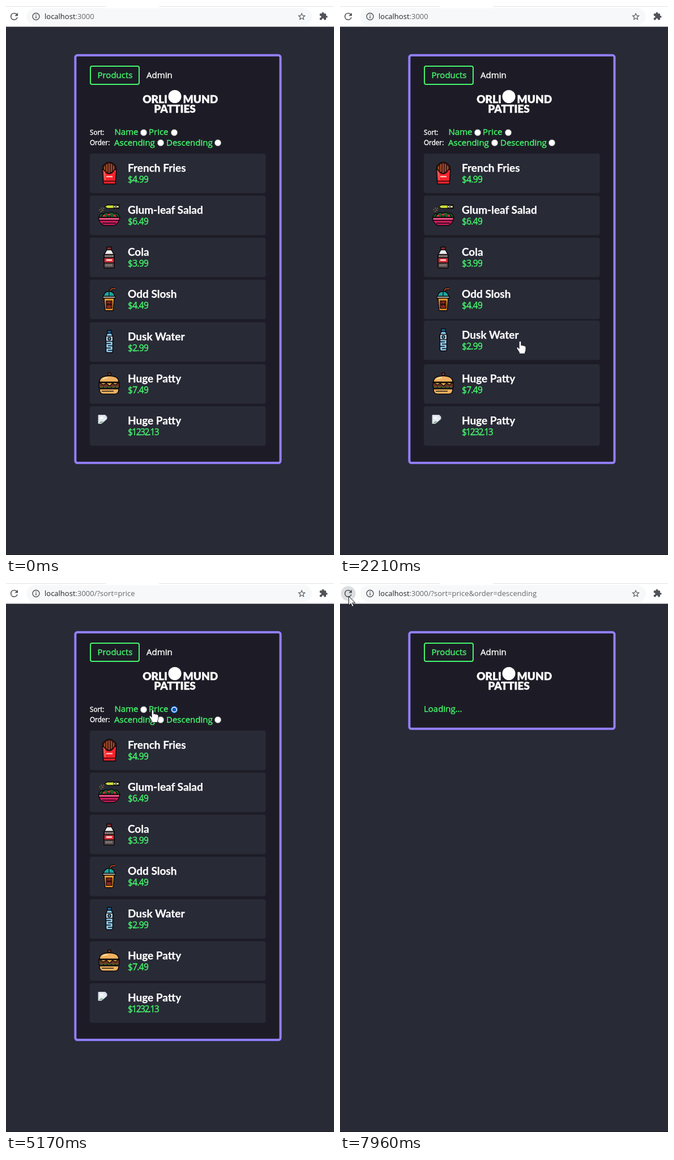
An HTML page that plays this animation: 579 by 967 pixels, repeating every 8000 ms.

```html
<!DOCTYPE html>
<html lang="en">
<head>
<meta charset="utf-8">
<title>Menu</title>
<style>
  html, body { margin: 0; width: 100%; height: 100%; overflow: hidden; background: #282a36; }
  svg { display: block; width: 579px; height: 967px; }
  text { font: 15px "Open Sans", sans-serif; fill: #fff; stroke: #fff; stroke-width: .4; white-space: pre; }
  .green { fill: #45f56d; stroke: #45f56d; }
  .url { font-size: 13px; fill: #63676c; stroke: none; }
  .host { fill: #202327; }
  .small { font-size: 11.7px; }
  .title { font: 700 19px Lato, sans-serif; stroke-width: .25; }
  .price { font-size: 15.5px; letter-spacing: -.7px; }
  .long { letter-spacing: -1.5px; }
  .brand { font: 900 19px Lato, sans-serif; }
  .ink { stroke: #08080b; stroke-width: 1.4; stroke-linejoin: round; }
  .line { fill: none; stroke: #08080b; stroke-width: 1.3; }
</style>
</head>
<body>
<svg viewBox="0 0 579 967">
  <defs>
    <g id="fries">
      <path class="ink" fill="#4a1a14" d="M-11 2V-13L-6-17L-2-19H4L8-16L12-12V2Z"/>
      <path d="M-8-12V-5M-4-16V-3M0-17V-1M4-16V-3M8-13V-5" stroke="#b9602f" stroke-width="1.6"/>
      <path class="ink" fill="#f5232b" d="M-12-7L-9-6Q-6 1 0 1T9-6L13-7L11 19H-10Z"/>
      <path class="line" d="M-10 14H11"/>
      <path d="M-5 6H6" stroke="#ffd9d0" stroke-width="2"/>
      <path d="M-8-3L-7 12" stroke="#ff7a70" stroke-width="1.5"/>
    </g>
    <g id="salad">
      <path class="ink" fill="#cfe03a" d="M-8-15L-3-18H18V-12H-3Z"/>
      <path d="M8-17H11V-13H8ZM13-17H17V-13H13Z" fill="#f5f5d8" stroke="#111"/>
      <path d="M-9-13L-13-9M-13-13L-18-8M-10-9L-16-5" stroke="#8c8130" stroke-width="1.5" stroke-dasharray="2 2"/>
      <path class="ink" fill="#1f5f2b" d="M-18 4Q-16-5-10-2Q-6-7-1-3Q4-8 9-3Q16-6 19 4Z"/>
      <path class="line" d="M-14 3L-11-1L-8 3M-3 3L0-2L3 3M8 3L12-1L15 3"/>
      <path d="M-11 1h4M-2-1h4M8 1h4" stroke="#e2283c" stroke-width="3"/>
      <path class="ink" fill="#cf1c5e" d="M-19 4H19Q18 14 9 18H-9Q-18 14-19 4Z"/>
      <path d="M-17 6.5H17" stroke="#ff80a5" stroke-width="1.3"/>
      <path class="line" d="M-17 9H17M-12 14H12"/>
    </g>
    <g id="cola">
      <path class="ink" fill="#8e2d2b" d="M-4-18H4V-13H-4Z"/>
      <path class="ink" fill="#f0efec" d="M-4-13H4L9-4H-9Z"/>
      <path class="ink" fill="#5d5050" d="M-9-5H9V17Q9 19 7 19H-7Q-9 19-9 17Z"/>
      <path class="ink" fill="#d9323a" d="M-9 1H9V10H-9Z"/>
      <path d="M-5 5H5" stroke="#ffe9e3" stroke-width="2.4"/>
      <path d="M-7-2H7M-6 14H6" stroke="#a39494" stroke-width="2" stroke-dasharray="2 1"/>
    </g>
    <g id="cup">
      <path d="M1-13L4-18L11-19" fill="none" stroke="#08080b" stroke-width="4"/>
      <path d="M1-13L4-18L11-19" fill="none" stroke="#c9572b" stroke-width="1.4"/>
      <path class="ink" fill="#1fa59f" d="M-10-5Q-8-14 0-14T10-5Z"/>
      <path class="ink" fill="#f79a2c" d="M-9-2H9L7 20H-7Z"/>
      <path class="ink" fill="#e8e2d4" d="M-11-5H11V-2H-11Z"/>
      <path class="ink" fill="#a92d22" d="M-5 3H5V16H-5Z"/>
      <path class="line" d="M0-14V-5M-2 5V13M2 5V13M-4 9H4"/>
    </g>
    <g id="water">
      <path class="ink" fill="#1c6da4" d="M-3-20H4V-15H-3Z"/>
      <path class="ink" fill="#8fcdf2" d="M-3-15H4L6.5-10V17L5 19H-4L-5.5 17V-10Z"/>
      <path class="ink" fill="#d9eefa" d="M-5.5-10H6.5V-1H-5.5Z"/>
      <circle cx=".5" cy="-5.5" r="2.6" fill="#2b91c9" stroke="#08080b" stroke-width="1.4"/>
      <path class="line" stroke-width="2" d="M-5.5 3H3M-2 7H6.5M-5.5 11H3M-2 15H6.5"/>
    </g>
    <g id="burger">
      <path class="ink" fill="#a33a2b" d="M-2-19H3V-15H-2Z"/>
      <path class="ink" fill="#efb160" d="M-17-3Q-17-14 0-14T17-3Z"/>
      <path d="M-11-8Q-8-11-2-11" stroke="#ffe0a2" stroke-width="2" fill="none"/>
      <path class="ink" fill="#6b3425" d="M-18-3H18V7H-18Z"/>
      <path class="ink" d="M-17-2H17L11 2L6-1L1 4L-5-1L-10 2Z" fill="#e0a53f"/>
      <path d="M-16 6H16" stroke="#4d7d35" stroke-width="1.6" stroke-dasharray="5 2"/>
      <path class="ink" fill="#efb160" d="M-17 9H17Q17 18 10 18H-10Q-17 18-17 9Z"/>
      <path class="line" d="M-13 13H8"/>
    </g>
    <g id="broken">
      <path d="M-19-19H-7L-4-16V-12L-11-6L-14-4H-19Z" fill="#e4ebf3" stroke="#c3c8cf"/>
      <path d="M-18-5Q-14-10-10-7L-14-5Z" fill="#7fae86"/>
      <path d="M-16-14h5" stroke="#fff" stroke-width="3"/>
      <path d="M-7-19V-16H-4" fill="#fff" stroke="#c3c8cf"/>
    </g>
  </defs>

  <rect width="579" height="967" fill="#282a36"/>
  <rect y="966" width="579" height="1" fill="#1c1d26"/>
  <rect width="579" height="36.5" fill="#fff"/>
  <path d="M0 .5H176M270 .5H579" stroke="#dfe2e6"/>
  <rect x="36" y="4" width="504" height="29" rx="14.5" fill="#f7f8f9"/>
  <circle id="halo" cx="14.5" cy="18.5" r="13" fill="#dcdee1"/>
  <g fill="#505357">
    <path transform="translate(4.6 8.6) scale(.82)" d="M17.65 6.35A7.96 7.96 0 0 0 12 4a8 8 0 1 0 7.73 10h-2.08A6 6 0 1 1 12 6c1.66 0 3.14.69 4.22 1.78L13 11h7V4z"/>
    <path transform="translate(513.8 10.3) scale(.69)" d="M22 9.24l-7.19-.62L12 2 9.19 8.63 2 9.24l5.46 4.73L5.82 21 12 17.27 18.18 21l-1.63-7.03zM12 15.4l-3.76 2.27 1-4.28-3.32-2.88 4.38-.38L12 6.1l1.71 4.04 4.38.38-3.32 2.88 1 4.28z"/>
    <path transform="translate(552.5 10) scale(.66)" d="M20.5 11H19V7c0-1.1-.9-2-2-2h-4V3.5a2.5 2.5 0 0 0-5 0V5H4c-1.1 0-2 .9-2 2v3.8h1.5a2.7 2.7 0 0 1 0 5.4H2V20c0 1.1.9 2 2 2h3.8v-1.5a2.7 2.7 0 0 1 5.4 0V22H17c1.1 0 2-.9 2-2v-4h1.5a2.5 2.5 0 0 0 0-5z"/>
    <circle cx="53" cy="18.5" r="6" fill="none" stroke="#505357" stroke-width="1.4"/>
    <path d="M52.3 17.8h1.5v4h-1.5zM52.3 15h1.5v1.5h-1.5z"/>
  </g>
  <text class="url" x="68" y="23"><tspan class="host">localhost</tspan>:3000<tspan id="query"></tspan></text>

  <rect id="panel" x="122.4" y="86.8" width="362.1" fill="#1d1c26" stroke="#9580ff" stroke-width="4" rx="3.5"/>
  <rect x="149" y="106" width="86" height="32" rx="3" fill="none" stroke="#45f56d" stroke-width="2"/>
  <text class="green" x="161.5" y="127">Products</text>
  <text x="248" y="127">Admin</text>
  <text class="brand" x="285" y="171" text-anchor="end">ORLI</text>
  <circle cx="298" cy="159.5" r="11.5" fill="#fff"/>
  <text class="brand" x="312.5" y="171">MUND</text>
  <text class="brand" x="298" y="188" text-anchor="middle">PATTIES</text>
  <text id="loading" class="green" x="148" y="227">Loading...</text>

  <g id="list">
    <text class="small" x="148" y="227">Sort:</text>
    <text class="green" x="191.5" y="227">Name</text>
    <text class="green" x="252" y="227">Price</text>
    <text class="small" x="148" y="245">Order:</text>
    <text class="green" x="191" y="246">Ascending</text>
    <text class="green" x="283" y="246">Descending</text>
  </g>

  <path id="hand" fill="#fff" stroke="#15151b" stroke-width=".8" d="M-1.8 1.5Q0-1 1.8 1.5V8Q4 6.5 5 8.5Q7 7 8 9.3Q10 8.5 10 11V15Q10 18 8.5 20V22.5H-1.5V20L-6 13Q-6.5 10.5-4 11L-1.8 13.5Z"/>
  <path id="arrow" fill="#fff" stroke="#15151b" d="M.5.5V16.5L4.2 13L6.7 18.7L9.2 17.6L6.7 12H11.8Z"/>
</svg>
<script>
const NS = 'http://www.w3.org/2000/svg';
const LOOP = 8000, TOP = 259.7, PITCH = 74.2;
const $ = id => document.getElementById(id);

function add(parent, tag, attrs, text) {
  const el = parent.appendChild(document.createElementNS(NS, tag));
  for (const key in attrs) el.setAttribute(key, attrs[key]);
  if (text) el.textContent = text;
  return el;
}

const products = [
  ['fries', 'French Fries', '$4.99'],
  ['salad', 'Glum-leaf Salad', '$6.49'],
  ['cola', 'Cola', '$3.99'],
  ['cup', 'Odd Slosh', '$4.49'],
  ['water', 'Dusk Water', '$2.99'],
  ['burger', 'Huge Patty', '$7.49'],
  ['broken', 'Huge Patty', '$1232.13']
];

const cost = i => +products[i][2].slice(1);
const initial = products.map((_, i) => i);
const descending = [...initial].sort((a, b) => cost(b) - cost(a));

const cards = products.map(([icon, name, price]) => {
  const g = add($('list'), 'g');
  add(g, 'rect', { x: 148, width: 310.5, height: 69.5, rx: 4, fill: '#282a36' });
  add(g, 'use', { href: '#' + icon, x: 182, y: 34.5 });
  add(g, 'text', { class: 'title', x: 215, y: 31.5 }, name);
  add(g, 'text', { class: 'green price' + (price.length > 6 ? ' long' : ''), x: 215, y: 50.5 }, price);
  return g;
});

const radios = [[243, 223], [297, 223], [273, 241], [374, 241]].map(([cx, cy]) => ({
  ring: add($('list'), 'circle', { cx, cy, r: 5.7, fill: '#fff' }),
  dot: add($('list'), 'circle', { cx, cy, r: 3.6 })
}));

// time, x, y, pointer shape
const moves = [
  [0, 0, 0, ''],
  [1190, 41, 15, 'arrow'], [1310, 144, 181, 'arrow'],
  [1460, 210, 266, 'hand'], [1580, 265, 330, 'hand'], [1700, 305, 386, 'hand'],
  [1820, 322, 436, 'hand'], [1940, 323, 492, 'hand'], [2060, 321, 536, 'hand'],
  [2210, 318, 590, 'hand'], [2330, 315, 630, 'hand'], [2450, 312, 664, 'hand'],
  [2570, 309, 696, 'hand'], [2690, 308, 721, 'hand'], [2840, 307, 742, 'hand'],
  [2990, 305, 745, 'hand'],
  [3700, 307, 648, 'hand'], [3820, 297, 540, 'hand'], [3940, 284, 416, 'hand'],
  [4060, 271, 300, 'hand'], [4180, 263, 218, 'hand'],
  [5170, 259, 223, 'hand'], [5290, 287, 231, 'hand'], [5410, 309, 236, 'hand'],
  [5560, 324, 240, 'hand'],
  [6730, 299, 212, 'arrow'], [6850, 212, 138, 'arrow'], [6970, 110, 70, 'arrow'],
  [7090, 48.5, 31.5, 'arrow'], [7240, 38, 29, 'arrow'], [7360, 28, 26, 'arrow'],
  [7480, 21, 24, 'arrow'], [7600, 17, 23, 'arrow'], [7720, 15, 23, 'arrow']
];

const show = (el, on) => el.setAttribute('visibility', on ? 'visible' : 'hidden');

function paintRadio({ ring, dot }, checked, hover) {
  const blue = hover ? '#0058c4' : '#0a75f5';
  ring.setAttribute('stroke', checked ? blue : hover ? '#4f4f4f' : '#767676');
  ring.setAttribute('stroke-width', checked ? 1.4 : 1);
  dot.setAttribute('fill', checked ? blue : 'none');
}

function draw(t) {
  const [, x, y, shape] = moves.findLast(m => m[0] <= t);
  const byPrice = t >= 4580, sorted = t >= 5990, loading = t >= 7960;

  for (const id of ['hand', 'arrow']) {
    show($(id), shape === id);
    $(id).setAttribute('transform', `translate(${x} ${y})`);
  }
  show($('halo'), shape && x < 28 && y < 33);

  $('query').textContent = (byPrice ? '/?sort=price' : '') + (sorted ? '&order=descending' : '');
  $('panel').setAttribute('height', loading ? 170 : 718);
  $('list').setAttribute('display', loading ? 'none' : 'inline');
  show($('loading'), loading);

  const hot = shape === 'hand' ? Math.floor((y - TOP) / PITCH) : -1;
  (sorted ? descending : initial).forEach((item, row) => {
    const top = TOP + row * PITCH - (row === hot ? 3 : 0);
    cards[item].setAttribute('transform', `translate(0 ${Math.round(top)})`);
  });

  const onLabel = shape === 'hand' && y < 258;
  paintRadio(radios[0], false, false);
  paintRadio(radios[1], byPrice, onLabel && y < 230);
  paintRadio(radios[2], false, false);
  paintRadio(radios[3], sorted, onLabel && y >= 230);
}

const start = performance.now();
function tick() {
  draw((performance.now() - start) % LOOP);
  requestAnimationFrame(tick);
}
tick();
</script>
</body>
</html>
```
